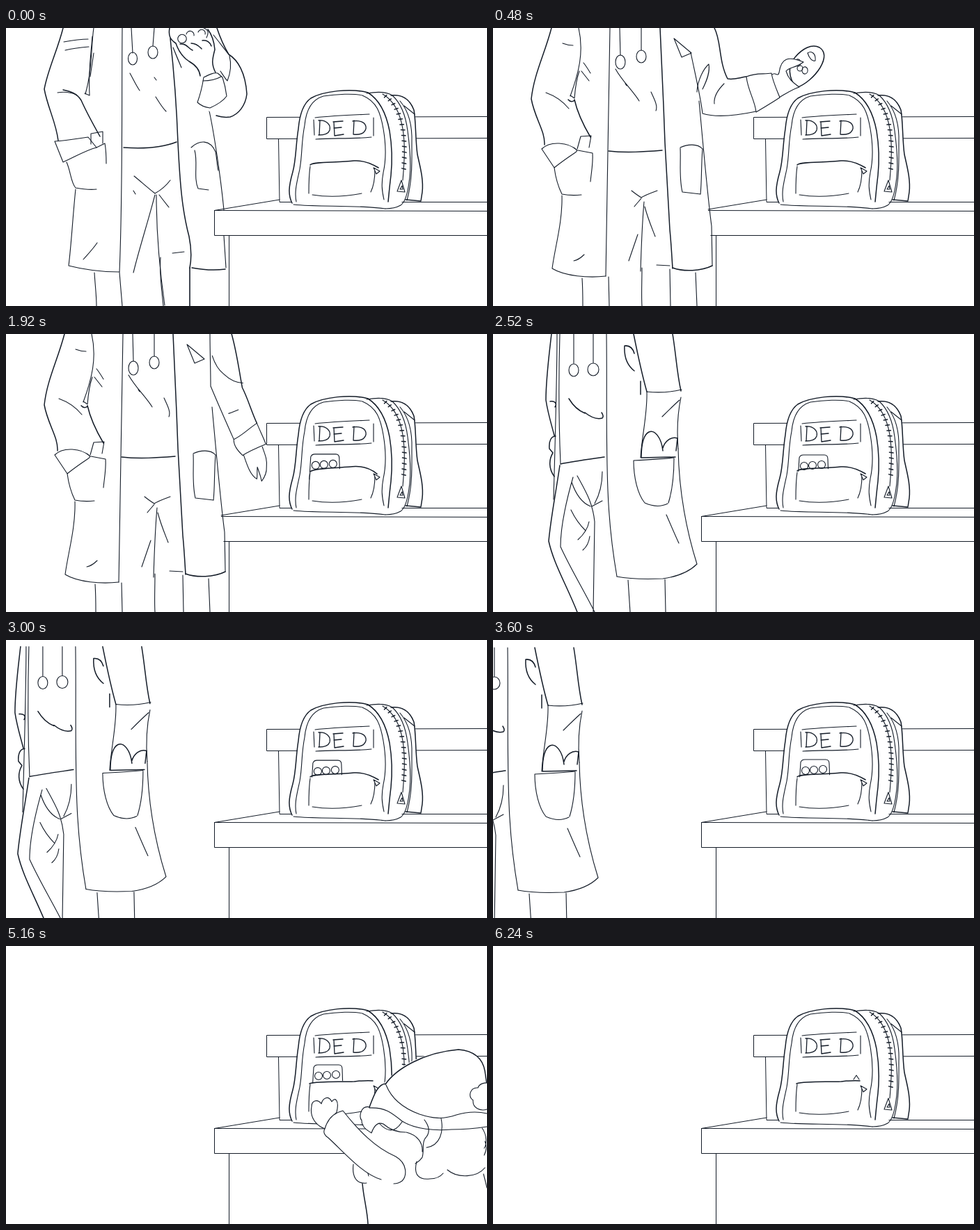
Write an HTML page that moves like this. It is 691 by 400 pixels and loops after 6360 ms.

```html
<!DOCTYPE html>
<html lang="en">
<head>
<meta charset="utf-8">
<title>Backpack on the bench</title>
<style>
html, body { margin: 0; width: 100%; height: 100%; overflow: hidden; background: #fff; }
svg { display: block; width: 100vw; height: 100vh; fill: none; stroke: #141c28; stroke-width: 1.1; stroke-linecap: round; stroke-linejoin: round; }
.thin { stroke-width: 1; }
.bold { stroke-width: 1.5; }
.mask { fill: #fff; stroke: none; }
.solid { fill: #fff; }
</style>
</head>
<body>
<svg viewBox="0 0 691 400" preserveAspectRatio="none">
  <g class="thin">
    <path d="M691 127.5L374.5 128.5V159.5L691 158.5M391.5 159.5L393 250.5H691"/>
    <path d="M393 247L299.5 262.5L691 263.5M299.5 262.5V298.5H691M320.5 298.5V400"/>
  </g>

  <g id="pack">
    <path class="mask" d="M411 254C404 236 414 206 418 168C422 130 424 110 437 101C460 88 500 86 520 92L556 93L580 102L588 125L590 180L599 235L596 249L577 247L546 260Z"/>
    <path class="bold" d="M411 252C405 240 406 228 412 207C417 188 416 170 420 145C422 122 428 108 438 101C455 91 495 86 520 93"/>
    <path d="M417 250C414 235 418 222 422 203C426 180 424 165 429 140C431 118 439 103 456 98C475 95 500 94 512 97C533 106 538 122 542 145C546 168 546 190 542 208C539 224 540 234 543 247"/>
    <path class="bold" d="M520 93C536 103 546 122 551 148C555 172 555 192 553 212C551 228 550 240 549 250"/>
    <path d="M518 94C530 92 546 91 555 97C567 108 574 124 577 148C581 178 582 205 579 222C577 238 574 250 567 255C560 259 552 260 545 260"/>
    <path class="bold" d="M553 97C568 95 580 102 586 118C589 134 588 160 591 182C595 200 600 218 598 236L596 249L574 247"/>
    <path d="M566 105C578 119 584 139 583 166C583 194 584 218 576 248M572 112L587 124"/>
    <path d="M413 254C450 258 500 254 545 260"/>
    <path id="zip" d="M541 95C557 104 566 122 570 145C574 170 572 195 570 219"/>
    <path id="teeth" class="bold"/>
    <path class="solid" d="M568 219L562 235L573 236ZM566 232L569 227L570 232Z"/>
    <path d="M444 129C470 126 498 125 522 124M442 132L443 154M445 160C468 158 495 160 525 157M528 129V155"/>
    <g stroke-width="1.3">
      <path d="M451 133L450 154M449 133C461 132 467 140 465 147C463 153 456 154 449 154"/>
      <path d="M471 135L472 155L485 153M470 135L484 134M471 144L482 143"/>
      <path d="M500 133L499 153M498 134C512 132 518 138 517 145C515 152 508 154 499 153"/>
    </g>
  </g>

  <g id="snack">
    <path class="solid" d="M438 210L440 178C441 175 443 174 446 174L476 174C480 174 481 176 481 180L482 210Z"/>
    <circle cx="447" cy="190" r="5.5"/><circle cx="459" cy="189" r="5.5"/><circle cx="472" cy="188" r="5.5"/>
  </g>
  <g id="pocket">
    <path class="mask" d="M436 199C450 193 500 193 530 198L528 238L437 240Z"/>
    <path id="flap" class="bold"/>
    <path d="M437 199C435 212 435 225 435 238M440 240C465 244 490 242 511 238M530 203C530 216 528 228 524 236"/>
    <path class="solid" d="M528 201L537 206L532 210Z"/>
    <path id="bulge" d="M482 207C483 217 480 226 475 232"/>
    <path id="peak" d="M518 192L522 186L526 192"/>
  </g>

  <g id="adult">
    <g id="body"></g>
    <g id="raised">
      <path class="mask" d="M300 0L320 38L340 60L346 95L335 122L302 127L276 108L284 70L255 40L234 0Z"/>
      <path class="bold" d="M303 0C308 15 314 28 320 38C333 46 344 64 346 95C344 112 334 124 322 128C315 129 308 128 302 126"/>
      <path d="M298 10C307 21 314 31 320 38M308 62C312 68 315 73 318 76C322 66 324 52 321 40"/>
      <path class="solid" d="M284 71C292 67 298 64 304 65L311 71C314 80 316 90 317 98C312 105 302 111 293 115C286 114 279 111 275 107C279 96 282 84 284 71Z"/>
      <path d="M283 76C291 76 302 74 309 70"/>
      <path class="bold" d="M235 0C233 11 236 17 244 22C248 34 254 42 263 48C272 53 278 60 279 69M301 64C295 52 296 46 300 31C299 20 296 10 290 2M250 23C260 22 262 30 268 32M266 22C274 22 278 27 281 30M282 18C290 17 293 21 295 26"/>
      <path d="M247 14a6 6 0 1 1 12 3a6 6 0 1 1 -12 -3M259 9a5 5 0 1 1 11 2M276 6a5 5 0 1 1 10 3M284 0C292 3 291 8 288 14"/>
    </g>
    <g id="arm">
      <path class="mask" id="armFill"/>
      <path class="bold" id="armTop"/>
      <path id="armLow"/>
      <g id="held">
        <path class="solid bold" d="M436 86C424 72 423 53 434 42C444 30 458 22 469 28C478 34 477 45 470 57C462 70 449 81 436 86Z"/>
        <path d="M452 36C458 32 464 37 463 47C459 49 454 43 452 36M434 49a4 5 0 1 1 8 2a4 5 0 1 1 -8 -2M437 58a4 4 0 1 1 8 0a4 4 0 1 1 -8 0M444 62a4 5 0 1 1 8 -2a4 5 0 1 1 -8 2"/>
      </g>
      <path class="solid" id="hand"/>
      <path class="solid" id="cuff"/>
      <path id="folds"/>
    </g>
  </g>

  <g id="walker">
    <path class="mask" d="M84 0L76 95L88 205L80 300L121 400H248L247 352L293 330L268 240L270 82L258 0Z"/>
    <path class="bold" d="M84 0C80 35 76 65 76 95C79 115 84 130 88 146M90 147C84 147 80 153 81 165L86 171C80 181 80 194 88 205M82 97C90 96 92 101 89 105"/>
    <path d="M92 0C92 60 90 130 87 238M96 0C94 70 95 140 97 186"/>
    <path class="bold" d="M96 189C90 230 83 265 80 298C87 330 105 360 121 400"/>
    <path d="M116 0V42M109 52a7 9 0 1 1 14 0a7 9 0 1 1 -14 0M144 0V42M136 51a8 9 0 1 1 16 0a8 9 0 1 1 -16 0"/>
    <path d="M163 0C164 75 162 150 165 225C167 278 173 320 178 349"/>
    <path class="bold" d="M97 187C118 183 140 180 160 177M109 93C115 103 122 110 132 114M132 113C142 121 150 123 157 121C159 119 158 116 156 113"/>
    <path d="M115 206C103 248 97 278 97 306C110 335 130 368 146 400M121 204C134 228 143 242 146 270L144 400M113 213C119 231 128 243 140 248M157 198C157 220 151 235 146 244M157 240L142 248"/>
    <path d="M112 253C118 266 125 275 133 283M138 270C136 281 131 288 122 296M129 311C135 306 138 299 139 291"/>
    <path class="bold" d="M202 0C208 30 214 58 221 83M258 0C263 30 264 55 270 82M189 17C188 34 194 46 203 53M189 17C197 16 201 21 203 28M212 68V87"/>
    <path d="M221 83C239 85 254 84 271 80M221 83C222 115 214 145 212 178M270 91C265 115 264 140 266 165M268 95C259 103 252 110 243 119"/>
    <path class="bold" d="M213 178C213 160 216 145 224 141C232 137 242 149 244 168M244 164C247 154 256 147 265 150L263 168M213 178L262 177"/>
    <path d="M202 182C222 181 242 180 260 178M202 182C202 207 208 231 218 243C229 248 241 249 251 244M260 179C260 203 257 227 252 243"/>
    <path d="M266 165C267 222 277 280 293 331C282 342 265 349 244 352C220 353 198 353 178 349M249 260C255 274 261 288 267 301M194 354L197 400M247 353L248 400"/>
  </g>

  <g id="kid">
    <path class="mask" d="M521 232C528 205 545 198 560 180C600 150 660 140 685 165L760 170V400H520L512 342L498 330L500 314L540 300L510 252Z"/>
    <path class="bold" d="M545 199C560 177 600 153 650 149C675 151 685 163 688 180L691 201M546 198C534 198 528 216 522 232"/>
    <path d="M546 200C554 220 572 234 594 242C612 248 627 250 647 243C664 238 678 238 691 241M522 233C544 232 553 239 569 252C588 264 617 266 640 264C660 264 678 262 691 260"/>
    <path class="solid" d="M700 197C686 196 680 198 678 204C667 203 663 216 671 222C670 233 681 238 691 235L700 235Z"/>
    <path d="M523 232C510 228 506 246 511 251C511 260 517 264 525 269C529 258 534 253 542 256C551 264 561 268 574 268M536 255C547 267 558 270 569 253"/>
    <path d="M625 248C629 267 624 287 604 290M601 250C610 262 608 271 602 277C597 284 601 294 598 304C595 309 591 311 588 313M575 268C591 272 599 283 598 296"/>
    <path d="M590 310C585 329 593 337 609 335C618 335 624 332 628 327M634 322C649 335 677 333 688 319M688 281C692 290 689 296 687 301M684 262C691 272 691 285 687 291"/>
    <path d="M499 314C497 330 502 343 518 341M506 315C513 315 519 321 521 331M686 328L691 348"/>
    <path class="bold" d="M512 342C514 364 519 380 520 400"/>
    <g id="reach">
      <g id="loot"><rect class="solid" x="444" y="188" width="38" height="42" rx="4"/><circle cx="453" cy="203" r="5"/><circle cx="464" cy="203" r="5"/><circle cx="475" cy="203" r="5"/></g>
      <path class="solid" d="M458 263C445 258 436 246 439 231C439 223 447 219 453 227C455 219 463 214 468 224C473 216 479 223 475 239Z"/>
      <path class="mask" d="M458 263C462 249 471 240 484 237C506 265 530 290 560 303C577 313 576 331 569 338L540 336C512 328 487 298 460 274Z"/>
      <path d="M458 263C462 249 471 240 484 237C506 265 530 290 560 303C577 313 576 331 569 338C565 341 561 342 557 342M458 263C455 268 458 273 463 276C487 298 512 328 539 336"/>
    </g>
  </g>
</svg>

<script>
const STEP = 120, TICKS = 53;
const $ = id => document.getElementById(id);
const clamp = v => Math.max(0, Math.min(1, v));
const ramp = (n, a, b) => clamp((n - a) / (b - a));
const ease = t => t * t * (3 - 2 * t);
const show = (id, on) => $(id).style.display = on ? "" : "none";
const move = (id, x, y = 0) => $(id).setAttribute("transform", `translate(${x} ${y})`);
const turn = (id, deg, x, y) => $(id).setAttribute("transform", `rotate(${deg} ${x} ${y})`);

// Blend two paths that share the same commands.
function mix(a, b, t) {
  const ends = b.match(/-?[\d.]+/g);
  let i = 0;
  return a.replace(/-?[\d.]+/g, v => +(+v + (ends[i++] - v) * t).toFixed(2));
}
const oval = (x, y, rx, ry) => `M${x - rx} ${y}a${rx} ${ry} 0 1 1 ${2 * rx} 0a${rx} ${ry} 0 1 1 ${-2 * rx} 0`;

// Coat and trousers: [first stance, second stance, class]
const BODY = [
  ["M291 115L305 190L313 262L316 345L267 345L250 200L247 120Z", "M296 80L302 200L312 290L315 343L258 345L246 200L243 80Z", "mask"],
  ["M82 0C74 32 60 60 55 88C60 115 72 136 75 162", "M84 0C74 38 59 66 55 102C60 130 75 148 74 168", "bold"],
  ["M126 0C122 28 124 60 114 95", "M123 0C131 35 123 65 111 98", ""],
  ["M83 20C94 18 106 16 118 16M85 32C97 29 108 28 119 27", "M100 22C105 24 110 25 115 25M130 50C134 55 137 60 140 65", ""],
  ["M82 89C92 91 102 94 108 104C116 122 126 140 135 156", "M108 103C112 108 117 105 117 103C121 121 130 140 140 157", "bold"],
  ["M74 93C86 91 94 93 101 96M126 36L121 70", "M76 93C90 98 100 105 109 116M127 62L138 76", ""],
  ["M113 94L120 97C118 60 122 40 124 12", "M111 97L117 101C118 88 119 76 124 62", ""],
  ["M70 163C86 162 104 159 118 157C122 162 126 167 130 172C114 176 98 186 82 193Z", "M70 174C82 162 108 164 121 176C120 178 119 179 117 180C108 186 98 193 88 201Z", ""],
  ["M122 167L122 152L139 149L139 166", "M121 174L126 156L141 155L138 172", ""],
  ["M87 193C93 206 93 222 100 230C111 232 120 233 130 232M130 172L142 166C144 177 144 186 144 195", "M88 201C90 216 95 231 99 239C109 241 118 241 127 240M122 176L143 180C144 195 141 209 140 221", ""],
  ["M100 232C96 270 94 310 90 342C113 348 137 351 163 351", "M99 241C100 280 89 315 85 346C103 357 137 360 162 357", ""],
  ["M131 309C125 318 118 325 111 333", "M131 326C126 331 121 334 116 335", ""],
  ["M167 0C166 100 168 230 163 351", "M168 0C166 110 164 240 162 357", ""],
  ["M236 15C241 60 245 110 247 165C250 225 253 262 263 300C266 315 267 330 264 345", "M240 0C243 60 245 110 247 165C250 220 252 260 254 290C256 310 257 330 258 346", "bold"],
  ["M169 172C198 174 225 172 245 164", "M166 177C192 180 218 178 243 176", "bold"],
  ["M180 0L182 36M213 0L211 26", "M182 0L183 39M213 0L213 32", ""],
  [oval(182, 44, 6.5, 9), oval(183, 49, 7, 10), ""],
  [oval(211, 35, 7, 9), oval(213, 41, 7, 9), ""],
  ["M178 65C183 74 187 83 192 90M215 99C220 107 224 114 230 120M213 71L216 75", "M176 59C186 77 200 89 210 105M227 92C232 103 237 112 234 119M190 80L192 83", ""],
  ["M184 213C195 222 205 231 214 238C223 233 230 227 236 219", "M199 234C204 238 208 241 213 244C221 239 228 237 236 234", ""],
  ["M214 240C204 279 192 315 183 352M216 240C216 290 221 350 228 399", "M203 257C206 253 210 249 213 245M217 250C214 285 213 315 212 350", ""],
  ["M220 240C226 248 230 253 234 258M183 234L186 239", "M218 257C222 273 228 287 233 300M208 297L195 335", ""],
  ["M239 324L256 322M222 330C220 355 224 377 226 400", "M235 341L254 342M214 345C214 365 213 384 214 400", ""],
  ["M127 352C128 370 130 385 130 400M163 352L167 400M264 345L264 400", "M128 360C129 375 129 388 129 400M166 358L167 400M254 347L255 400", ""],
  ["M264 345L264 400", "M291 352L293 400", ""],
  ["M291 115C299 150 309 220 313 262M313 299L316 345", "M296 105C302 170 308 240 314 285M314 285L315 342", ""],
  ["M267 345C283 348 300 349 315 347", "M258 345C274 351 299 350 315 342", "bold"],
  ["M266 172C278 161 293 160 301 178M271 176C276 194 269 215 276 231L291 233", "M269 172C279 167 294 166 301 174M269 173C270 194 267 215 272 236L298 239", ""],
  ["M301 178C303 188 303 197 305 205", "M301 174C299 198 300 220 298 239", ""],
  ["M240 28L246 43L252 57Z", "M260 15L285 36L271 42Z", ""]
];

// Arm poses: held out, in the pocket, hanging
const ARM = {
  armFill: ["M298 0L318 0L337 73L364 70L378 120L301 125L296 80Z", "M293 0L328 0L344 63L398 107L370 151L332 117L294 75Z", "M293 0L322 0L337 85L340 140L304 152L300 115L294 75Z"],
  armTop: ["M318 0C328 18 324 48 337 73C346 75 355 71 364 70", "M328 0C335 22 337 44 344 63C364 68 378 88 398 107", "M322 0C330 30 334 60 337 85C338 105 339 125 340 140"],
  armLow: ["M284 35C289 60 298 97 301 123M301 123C320 129 350 126 378 120", "M293 0C293 25 294 50 294 75M294 75C318 104 345 132 370 151", "M293 0C293 25 294 50 294 75M294 75C298 100 301 125 304 152"],
  hand: ["M400 68C405 61 409 72 411 64C414 43 424 40 446 49C434 58 426 56 421 62C425 76 434 80 440 85C430 88 420 95 411 100", "M420 137C428 148 437 152 441 165C446 172 447 182 447 193C442 186 436 184 433 176C435 184 441 190 442 195C425 194 415 180 403 164", "M340 176C342 188 342 196 338 206C336 214 330 220 324 222C324 212 324 206 322 200C320 208 318 212 316 216C310 208 308 190 308 180"],
  cuff: ["M364 70C378 64 389 67 400 65C402 77 408 90 412 100C400 108 388 115 378 121C376 103 366 90 364 70Z", "M398 107C408 113 420 121 429 128C416 136 406 148 402 165C390 163 371 161 370 151C380 140 386 122 398 107Z", "M340 140C342 155 343 165 343 175C332 178 318 180 306 180C304 172 303 162 304 152C316 150 328 144 340 140Z"],
  folds: ["M293 92C294 74 303 58 310 52C312 64 307 76 301 88M332 80C322 90 317 100 318 109", "M295 30C300 43 307 52 316 57C325 63 340 67 354 64M338 104C342 102 346 99 350 96", "M297 32C300 43 305 52 311 58C318 66 326 72 333 74M310 120C315 119 320 117 325 116"]
};

const FLAP = {
  shut: "M437 197C441 192 478 194 500 191C514 190 525 195 535 201",
  full: "M437 199C450 193 480 191 505 190C517 191 526 195 530 202",
  open: "M436 198C450 194 480 196 500 195C510 194 518 193 527 194"
};

const parts = BODY.map(row => {
  const p = document.createElementNS("http://www.w3.org/2000/svg", "path");
  p.setAttribute("class", row[2]);
  $("body").append(p);
  return p;
});

// Zipper teeth set across the seam
const zip = $("zip"), zipLen = zip.getTotalLength();
let teeth = "";
for (let s = 6; s < zipLen - 8; s += 8) {
  const a = zip.getPointAtLength(s - 1), b = zip.getPointAtLength(s + 1);
  const nx = (b.y - a.y) * 1.4, ny = (a.x - b.x) * 1.4;
  teeth += `M${a.x - nx} ${a.y - ny}L${a.x + nx} ${a.y + ny + 1}`;
}
$("teeth").setAttribute("d", teeth);

function drawAdult(n) {
  show("adult", n < 19);
  if (n >= 19) return;
  const stance = ease(ramp(n, 0, 4));
  BODY.forEach(([a, b], i) => parts[i].setAttribute("d", mix(a, b, stance)));
  parts[0].style.display = n < 2 ? "none" : "";

  show("raised", n < 2);
  show("arm", n >= 2);
  move("raised", n * 4, n * 3);
  const put = ease(ramp(n, 4, 9)), back = ease(ramp(n, 13, 18));
  for (const id in ARM) {
    const [out, into, down] = ARM[id];
    $(id).setAttribute("d", n < 13 ? mix(out, into, put) : mix(into, down, back));
  }
  if (n < 4) turn("arm", (n - 4) * 15, 312, 95);
  else move("arm", 0, n > 8 && n < 12 ? (n - 12) * 2 : 0);
  show("held", n < 9);
  $("held").setAttribute("transform", `translate(${put * 8} ${put * 128}) rotate(${-35 * put} 450 55)`);
}

function drawWalker(n) {
  const on = n >= 19 && n < 36;
  show("walker", on);
  if (!on) return;
  const x = n <= 30 ? (21 - n) * 142 / 9 : -142 - (n - 30) * 27;
  move("walker", x, 11 * Math.abs(Math.sin((n - 21) * Math.PI / 6)));
}

function drawKid(n) {
  const on = n >= 33 && n < 52;
  show("kid", on);
  if (!on) return;
  const enter = 1 - ramp(n, 33, 43);
  move("kid", n < 43 ? 255 * enter ** 1.5 : 260 * ramp(n, 48, 52));
  turn("reach", 22 * ease(ramp(n, 43, 47)), 560, 325);
  show("loot", n >= 45);
}

function drawPocket(n) {
  show("snack", n >= 9 && n < 45);
  const settle = ramp(n, 12, 21), drift = ramp(n, 21, 30);
  move("snack", -4 + 4 * settle + 2 * drift, -2 + 2 * settle - 2 * drift - ramp(n, 30, 43));
  const flap = n < 43 ? mix(FLAP.shut, FLAP.full, ramp(n, 6, 10) * (1 - ramp(n, 13, 18))) : FLAP.open;
  $("flap").setAttribute("d", flap);
  show("bulge", n >= 9 && n < 14);
  show("peak", n >= 45);
}

let last = -1;
function frame(now) {
  const n = Math.floor(now / STEP) % TICKS;
  if (n !== last) {
    last = n;
    drawPocket(n);
    drawAdult(n);
    drawWalker(n);
    drawKid(n);
  }
  requestAnimationFrame(() => frame(performance.now() - start));
}
const start = performance.now();
frame(0);
</script>
</body>
</html>
```
